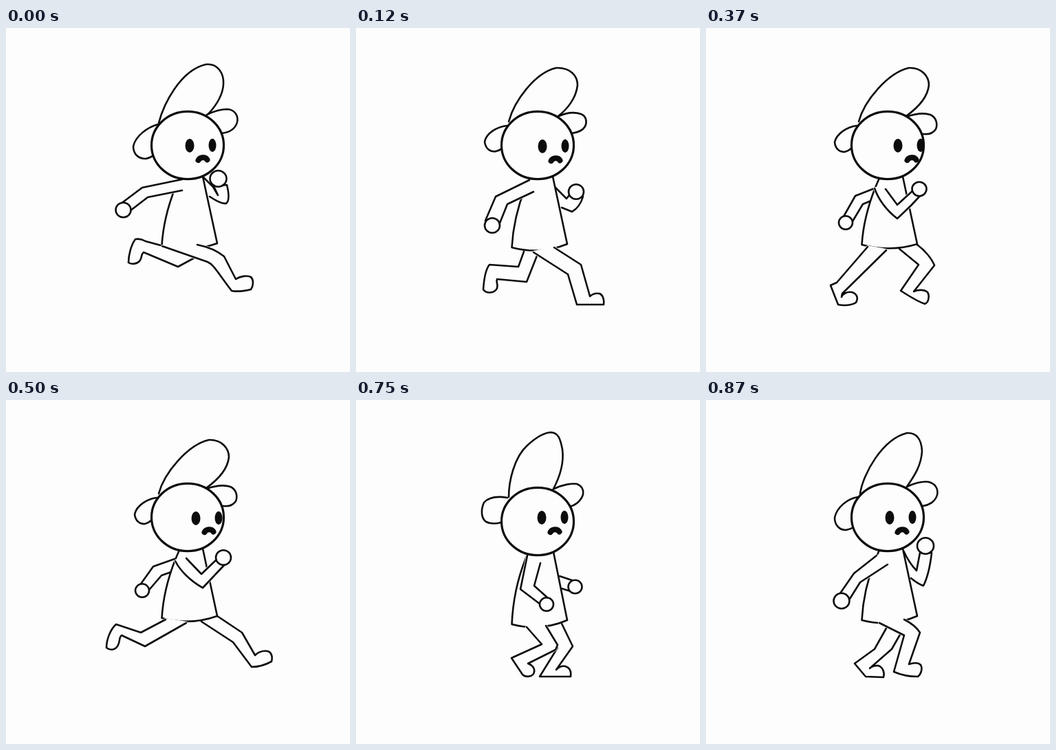
These frames come from a looping animation (500 px wide and 500 px high, 1 s). An HTML page with a canvas:

```html
<!DOCTYPE html>
<html lang="en">
<head>
<meta charset="utf-8">
<title>Run cycle</title>
<style>
html, body { margin: 0; width: 100%; height: 100%; overflow: hidden; background: #fdfdfd; }
canvas { display: block; width: 500px; height: 500px; }
</style>
</head>
<body>
<canvas id="stage" width="500" height="500"></canvas>
<script>
const ctx = document.getElementById('stage').getContext('2d');
const INK = '#0c0c0c', PAPER = '#fdfdfd', LOOP = 1000;

// Hat and both ears, from upright to blown back
const hatUp = [
  'M222 141C222 118 230 83 249 66C261 55 274 47 284 47C294 48 297 56 300 72C303 95 293 118 286 131',
  'M288 129C300 123 313 121 321 122C331 126 332 135 328 142C324 149 318 153 311 155',
  'M220 142C208 140 194 140 186 149C181 160 182 172 189 177C196 181 203 180 211 178'];
const hatLean = [
  'M222 136C230 106 264 65 295 58C313 57 324 70 324 83C322 102 305 118 291 128',
  'M291 129C303 125 317 123 326 126C335 130 337 140 334 147C330 153 323 155 316 154',
  'M219 142C205 144 190 153 187 166C188 176 195 181 202 180C206 179 209 177 211 175'];
const hatSoft = [
  'M222 136C230 106 260 65 291 58C312 57 322 70 322 83C320 102 307 118 294 128',
  'M295 128C306 123 318 122 327 125C335 128 336 137 333 143C329 150 321 152 314 153',
  'M219 142C205 144 190 152 187 165C188 176 196 181 204 179C208 178 210 177 212 175'];
const hatHigh = [
  'M224 136C228 108 256 57 292 48C306 47 313 57 314 74C313 95 303 110 292 126',
  'M292 126C303 121 315 118 323 119C333 121 338 129 336 138C333 148 324 153 315 154',
  'M221 141C206 143 190 156 187 171C187 183 195 189 203 189C208 188 211 187 214 185'];
const hatFly = [
  'M222 138C229 111 253 62 290 53C308 51 317 66 316 82C315 98 306 112 294 125',
  'M292 126C304 120 314 118 322 118C333 119 338 128 336 137C333 147 324 152 313 153',
  'M221 140C206 144 188 157 185 172C185 184 193 190 203 190C208 189 211 188 214 185'];

// hem: left and right height; hands: x, y, radius; face: eye x, eye y, mouth x, mouth y
const leapNear = {
  hat: hatFly, headY: 170.5, hem: [316, 313], face: [267, 171, 286, 190],
  farArm: 'M287 217L301 231L308 243L302 230L321 228C324 240 325 251 320 255C314 256 305 251 296 245',
  nearArm: 'M256 220L198 232L166 256L180 266L206 246L256 236',
  farHand: [308.5, 219, 12], nearHand: [170.5, 264.5, 11],
  farLeg: 'M240 320L203 310C198 307 193 306 188 307C182 315 178 330 178 341C183 344 190 343 194 339C199 333 195 330 200 326L250 347L274 334',
  nearLeg: 'M227 317L293 340C302 344 306 353 328 382C338 384 347 382 356 380C360 374 360 366 356 362C350 359 340 361 334 365L317 332C305 322 293 318 278 315'
};
const landNear = {
  hat: hatSoft, headY: 170.5, hem: [319, 314], face: [271, 172, 290, 191],
  farArm: 'M289 231L306 248L314 238L330 245C327 255 321 263 314 267L299 261',
  nearArm: 'M252 221L203 245L188 280L208 286L220 256L258 238',
  farHand: [320, 238, 11], nearHand: [198, 287, 11],
  farLeg: 'M244 325L236 347L194 344C189 350 186 365 185 380C189 386 199 386 204 380C208 374 203 370 205 365L248 369L265 326',
  nearLeg: 'M258 326L308 358L321 402L360 402C361 395 359 388 354 386C348 385 343 387 340 390L327 344L288 319'
};
const passNear = {
  hat: hatUp, headY: 176.5, headX: 263, hem: [325, 320], face: [276, 178, 294, 197],
  farArm: 'M297 269L313 275L309 290L301 286',
  nearArm: 'M250 224L208 267L233 303L248 303L232 268L255 242',
  farHand: [316.5, 282.5, 10], nearHand: [243, 309, 10],
  farLeg: 'M260 332L251 346L205 367L220 399C226 402 233 400 235 394C237 387 233 382 228 380L270 361L274 353',
  nearLeg: 'M260 332L276 356L260 402C275 403 290 406 303 404C306 402 307 397 305 391C301 384 291 385 284 389L300 356L284 327'
};
const pushNear = {
  hat: hatLean, headY: 170.5, hem: [315, 314], face: [279, 171, 299, 190],
  farArm: 'M245 233L217 244L200 274L213 281L228 256L240 251',
  nearArm: 'M245 233C250 248 262 265 278 277L298 258L311 244L301 236L278 257L261 234',
  farHand: [203, 283, 10], nearHand: [310, 234, 10.5],
  farLeg: 'M281 321L309 344L283 382C293 388 306 397 318 401C324 399 325 389 322 384C316 379 306 381 302 383L332 345C328 335 318 323 307 315',
  nearLeg: 'M235 318L190 370L181 374L192 402C200 404 212 403 218 399C222 392 219 386 212 384C205 383 199 386 197 391L198 386L262 323'
};
const leapFar = {
  hat: hatLean, headY: 170.5, hem: [317, 314], face: [276, 172, 295, 190],
  farArm: 'M245 231L214 242L194 270L208 276L226 255L240 250',
  nearArm: 'M246 234C253 248 268 263 286 273L319 238L308 230L284 253L262 230',
  farHand: [198, 277, 10], nearHand: [316, 229, 11],
  farLeg: 'M284 322L330 352L357 388C366 388 377 385 386 380C388 372 385 366 380 365C372 364 366 367 362 371L343 338L307 314',
  nearLeg: 'M232 319L196 338L160 326C152 333 146 348 146 360C152 365 160 363 163 356C166 350 164 345 168 342L202 358L262 324'
};
const landFar = {
  hat: hatSoft, headY: 170.5, hem: [320, 314], face: [272, 175, 289, 190], blink: true,
  farArm: 'M245 231L222 241C212 255 206 265 204 279L221 283L234 253L239 250',
  nearArm: 'M246 235C255 248 272 262 293 271L305 262L319 243L310 233L290 250L262 226',
  farHand: [212, 286, 9.5], nearHand: [318.5, 232.5, 10.5],
  farLeg: 'M284 324L313 356L323 401L361 401C362 395 360 387 355 385C349 384 343 387 341 390L329 344L306 316',
  nearLeg: 'M244 325L236 347L194 344C189 350 186 365 185 380C189 386 199 386 204 380C208 374 203 370 205 365L248 369L265 326'
};
const passFar = {
  hat: hatUp, headY: 176.5, hem: [326, 320], face: [270, 171, 289, 190],
  farArm: 'M296 256L314 262L312 278L299 274',
  nearArm: 'M249 226L239 275L268 297L278 287L259 270L268 237',
  farHand: [318.5, 271.5, 10], nearHand: [277, 297, 10],
  farLeg: 'M293 360L267 402L312 402C313 395 311 389 304 387C298 386 294 389 291 392L315 358L298 323',
  nearLeg: 'M248 330L270 355L226 375L242 399C246 403 254 403 258 398C261 392 258 386 250 383L290 363L293 356L276 328'
};
const pushFar = {
  hat: hatHigh, headY: 170.5, hem: [320, 314], face: [267, 171, 285, 190],
  farArm: 'M287 219C293 232 300 242 306 248L311 222L328 222C326 240 322 258 316 270C310 268 304 264 298 259',
  nearArm: 'M248 226L215 252L195 281L209 289L224 265L264 239',
  farHand: [319, 212, 12], nearHand: [197, 292, 11.5],
  farLeg: 'M263 330L245 362L216 383L232 402L258 403C260 396 257 388 250 386C244 386 240 388 238 390L270 362L282 341',
  nearLeg: 'M252 324L288 342L273 395C284 400 298 402 308 402C313 398 315 390 312 385C308 381 301 382 295 384L311 338C305 329 298 324 288 319'
};

const cycle = [
  [0, leapNear], [120, landNear], [250, passNear], [370, pushNear],
  [500, leapFar], [620, landFar], [750, passFar], [870, pushFar]
];

function shape(path, width = 2.6) {
  ctx.lineWidth = width;
  ctx.fill(path);
  ctx.stroke(path);
}

const line = d => shape(new Path2D(d));

// A limb in front wipes out the lines at its open end
function nearLimb(d) {
  ctx.strokeStyle = PAPER;
  ctx.lineWidth = 4;
  ctx.stroke(new Path2D(d + 'Z'));
  ctx.strokeStyle = INK;
  line(d);
}

function oval(x, y, rx, ry) {
  const p = new Path2D();
  p.ellipse(x, y, rx, ry, 0, 0, 2 * Math.PI);
  return p;
}

const hand = ([x, y, r]) => shape(oval(x, y, r, r - 0.3));

const torso = ([left, right]) =>
  line(`M252 218L246 232C235 260 228 290 226.5 ${left}Q268 ${left + 11} 307 ${right}L286 216`);

function mark(x, y, d, width) {
  ctx.save();
  ctx.translate(x, y);
  ctx.lineWidth = width;
  ctx.stroke(new Path2D(d));
  ctx.restore();
}

function drawHead({ headX = 264, headY, face: [eyeX, eyeY, mouthX, mouthY], blink }) {
  const skull = oval(headX, headY, 52.5, 49.2);
  shape(skull, 3.2);
  ctx.save();
  ctx.clip(skull);
  ctx.fillStyle = INK;
  if (blink) {
    for (const x of [eyeX, eyeX + 33]) mark(x, eyeY, 'M-5 -1Q0 5 5 -1', 2.8);
  } else {
    ctx.fill(oval(eyeX, eyeY, 6.5, 10));
    ctx.fill(oval(eyeX + 33, eyeY - 0.5, 5.5, 9.7));
  }
  mark(mouthX, mouthY, 'M-6.5 2.2C-4 -3 4 -3 6.5 1.5', 8);
  ctx.restore();
}

function draw(pose) {
  ctx.fillStyle = PAPER;
  ctx.strokeStyle = INK;
  ctx.lineCap = ctx.lineJoin = 'round';
  ctx.fillRect(0, 0, 500, 500);
  pose.hat.forEach(line);
  line(pose.farLeg);
  line(pose.farArm);
  torso(pose.hem);
  hand(pose.farHand);
  nearLimb(pose.nearLeg);
  nearLimb(pose.nearArm);
  hand(pose.nearHand);
  drawHead(pose);
}

function tick() {
  const t = performance.now() % LOOP;
  draw(cycle.findLast(([start]) => start <= t)[1]);
  requestAnimationFrame(tick);
}
tick();
</script>
</body>
</html>
```
